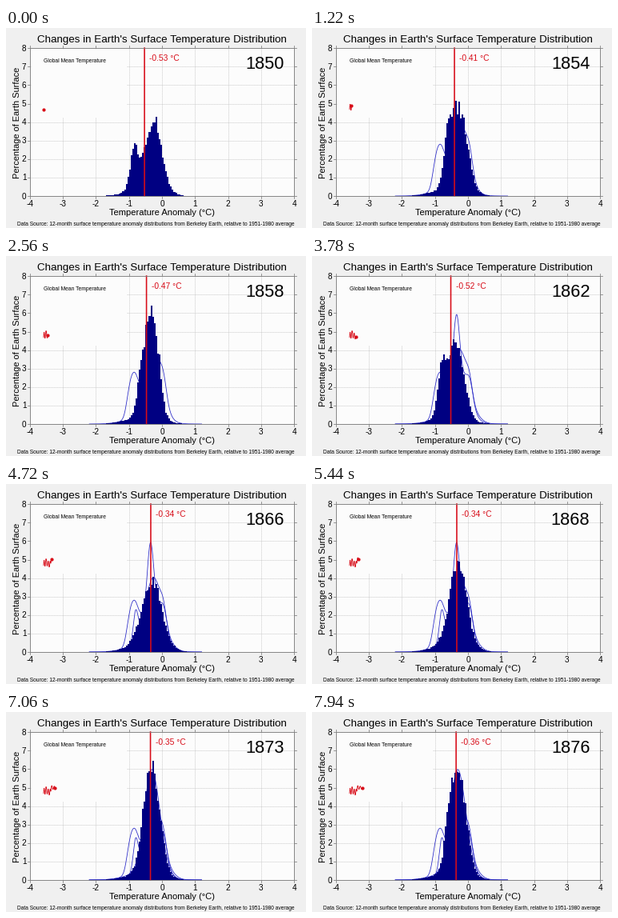
A matplotlib script that plays this animation: 375x250 px, repeating every 8000 ms.

```python
import numpy as np
import matplotlib.pyplot as plt
from matplotlib.animation import FuncAnimation
from matplotlib.patches import Rectangle

W, H, DPI = 375, 250, 100
FRAMES, INTERVAL = 200, 40
STEPS = 144  # data steps in one loop
PX = 72 / DPI
NAVY, BLUE, RED, GREY = "#000082", "#2a2ac8", "#d80c18", "#808080"
plt.rcParams["font.family"] = "Liberation Sans"

# Key moments: step, mean temperature, then the bells that shape the histogram:
# core height, middle, width, and side height, middle
KEYS = np.array([
    (0, -.53, 3.7, -.25, .25, 2.1, -.84),
    (22, -.41, 4.4, -.25, .24, 2.0, -.60),
    (46, -.47, 5.7, -.30, .20, 1.6, -.62),
    (68, -.52, 3.8, -.35, .24, 2.4, -.78),
    (85, -.34, 3.4, -.30, .30, 0, -.70),
    (111, -.34, 5.2, -.28, .24, .6, -.40),
    (143, -.36, 5.3, -.27, .23, 1.7, -.57)])

BIN = .05
EDGES = np.arange(-2.6, 1.4, BIN)
MIDS = EDGES[:-1] + BIN / 2
NOISE = np.random.default_rng(4).normal(0, .06, (14, len(MIDS)))


def px(v):
    return 195 + 41.3 * np.asarray(v)


def py(h):
    return 210 - 23.1 * np.asarray(h)


def place(s):
    """Position of a step among the key moments."""
    return np.interp(s, KEYS[:, 0], np.arange(len(KEYS)))


def swing(s):
    """Wiggle that vanishes at every key moment."""
    s = np.asarray(s)
    return .14 * np.exp(-s / 120) * np.sin(2 * np.pi * place(s))


def temp(s):
    return np.interp(s, KEYS[:, 0], KEYS[:, 1]) + swing(s)


def trace_xy(s):
    return 47 + .112 * s, 101.5 - 37 * (temp(s) + .53)


def year(s):
    return int(1850.71 + .18 * s)


def blend(rows, pos):
    i = min(int(pos), len(rows) - 2)
    return rows[i] + (rows[i + 1] - rows[i]) * (pos - i)


def bell(x, amp, mid, width):
    return amp * np.exp(-.5 * ((x - mid) / width) ** 2)


def shape(x, key):
    return (bell(x, *key[2:5]) + bell(x, *key[5:7], .13)
            + bell(x, .4, -.55, .48))


def heights(s):
    pos = float(place(s))
    i = min(int(pos), len(KEYS) - 2)
    x = MIDS - swing(s)
    h = blend([shape(x, KEYS[i]), shape(x, KEYS[i + 1])], pos - i)
    return h * (1 + blend(NOISE, s / 11.5))


fig = plt.figure(figsize=(W / DPI, H / DPI), dpi=DPI, facecolor="#f0f0f0")
ax = fig.add_axes([0, 0, 1, 1])
ax.set(xlim=(0, W), ylim=(H, 0))
ax.axis("off")


def line(xs, ys, color, lw=1, z=2, **kw):
    return ax.plot(xs, ys, color=color, lw=lw * PX, zorder=z, **kw)[0]


def text(x, y, s, size, ha="center", color="black", **kw):
    kw.setdefault("va", "baseline")
    return ax.text(x, y, s, fontsize=size * PX, ha=ha, color=color, zorder=8, **kw)


# Static parts
ax.add_patch(Rectangle((30, 25), 330, 185, fc="#fcfcfc", ec="none", zorder=0))
dots = dict(ls=(0, (1, 1.5)))
for v in range(-4, 5):
    x = px(v)
    line([x, x], [25, 210], "#b4b4b4", .8, 1, **dots)
    for y in (22, 210):
        line([x, x], [y, y + 3], GREY, .8)
    text(x, 222.7, str(v), 10)
for h in range(9):
    y = py(h)
    line([30, 360], [y, y], "#b4b4b4", .8, 1, **dots)
    for x in (27, 360):
        line([x, x + 3], [y, y], GREY, .8)
    text(25.5, y + 3.6, str(h), 10, "right")
ax.add_patch(Rectangle((32, 27), 119, 85, fc="#fcfcfc", ec="none", zorder=1.5))
ax.add_patch(Rectangle((30, 25), 330, 185, fc="none", ec=GREY, lw=.9 * PX, zorder=6))

text(194.8, 17.7, "Changes in Earth's Surface Temperature Distribution", 13.42)
text(194.7, 234.3, "Temperature Anomaly (°C)", 11.15)
text(14.2, 118, "Percentage of Earth Surface", 11, rotation=90, va="center")
text(187.7, 247.2, "Data Source: 12-month surface temperature anomaly distributions "
     "from Berkeley Earth, relative to 1951-1980 average", 6.67)
text(47, 43, "Global Mean Temperature", 6.75, "left")

# Past distributions left behind as thin outlines
grid = np.linspace(-2.2, 1.2, 171)
bump = bell(grid, .8, .05, .09)
fifties = shape(grid, KEYS[0]) + bell(grid, .7, -1, .09) + bump
sixties = (bell(grid, 3.1, -.35, .09) + bell(grid, 2.9, -.28, .32)
           + bell(grid, 1.5, -.8, .07) + bump)
seventies = shape(grid, KEYS[5])
outlines = [(start, line(px(grid), py(h), BLUE, .8, 2.5))
            for start, h in ((1851, fifties), (1861, sixties), (1871, seventies))]

# Moving parts
bars = ax.fill([0, 1, 1], [0, 0, 1], fc=NAVY, ec="none", zorder=3)[0]
mean_line = line([], [], RED, 1.6, 5, snap=False)
mean_text = text(0, 40.8, "", 10.2, "left", RED)
year_text = text(347.5, 51.3, "", 21.8, "right")
trace = line([], [], RED, .9, 4)
dot = line([], [], RED, 1, 5, marker="o", ms=4.2 * PX, mec="none")


def update(i):
    s = round(i * STEPS / FRAMES)
    h = np.repeat(heights(s), 2)
    xs = np.repeat(px(EDGES), 2)[1:-1]
    bars.set_xy(np.vstack([(xs[0], 210), np.c_[xs, py(h)], (xs[-1], 210)]))
    t, now = float(temp(s)), year(s)
    x = float(px(t))
    mean_line.set_data([x, x], [25, 210])
    mean_text.set_x(x + 6)
    mean_text.set_text(f"{t:.2f} °C")
    year_text.set_text(str(now))
    for start, curve in outlines:
        curve.set_visible(now >= start)
    tx, ty = trace_xy(np.arange(s + 1))
    trace.set_data(tx, ty)
    dot.set_data(tx[-1:], ty[-1:])
    return bars, mean_line, mean_text, year_text, trace, dot


anim = FuncAnimation(fig, update, frames=FRAMES, interval=INTERVAL,
                     init_func=lambda: update(0), repeat=True, repeat_delay=0)
plt.show()
```
